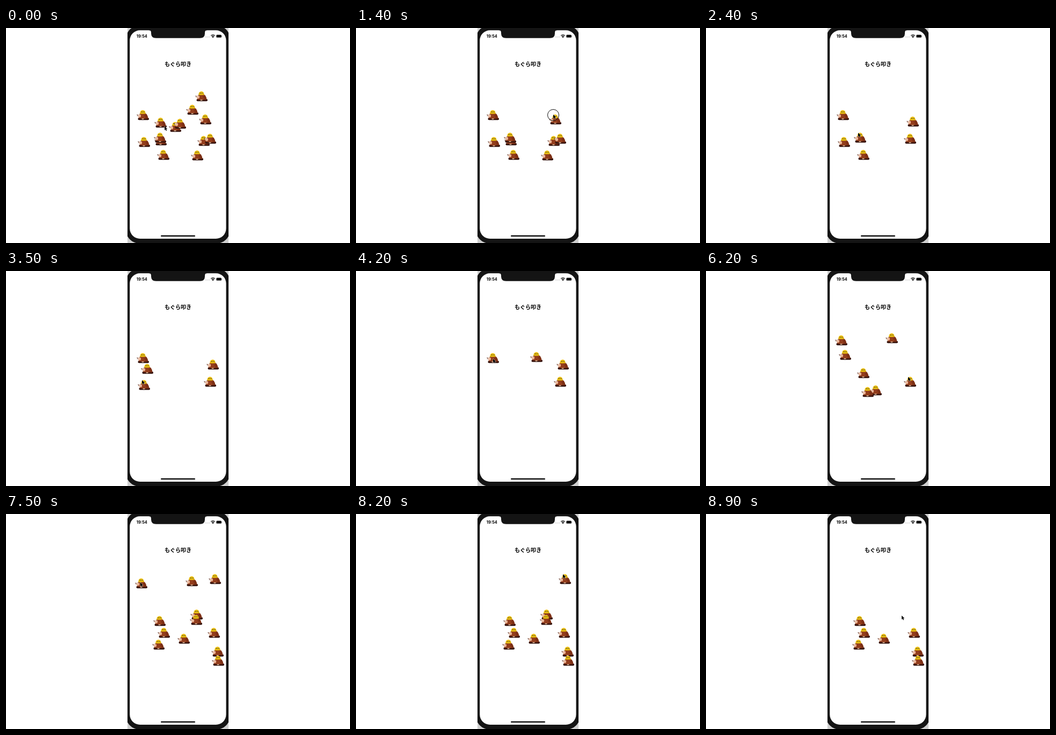
An HTML page for the animation above (9 s loop, 640 by 400 pixels).

```html
<!DOCTYPE html>
<html lang="ja">
<head>
<meta charset="utf-8">
<title>もぐら叩き</title>
<style>
  html, body { margin: 0; width: 100%; height: 100%; overflow: hidden; background: #fff; }
  svg { display: block; }
  .clock { font: 700 7.4px Inter, "Liberation Sans", sans-serif; }
  .title { font: 700 10px "Noto Sans CJK JP", "Noto Sans CJK", sans-serif; }
</style>
</head>
<body>
<svg width="640" height="400" viewBox="0 0 640 400">
  <defs>
    <clipPath id="shot"><rect x="226" width="188" height="400"/></clipPath>
    <g id="mole">
      <rect x="-8.5" y="5" width="20.5" height="4.3" rx="2.1" fill="#35130d"/>
      <path d="M-7 6C-7.5 2-6-2-2-4C3-5 7-3 8.6 0C9.8 2.4 10.4 4.5 10.2 6.3Q1 7.4-7 6Z" fill="#933d1c"/>
      <path d="M3 1Q6 3 5 6.3L10 6.2Q10 2 7-2.5Z" fill="#7d3016"/>
      <ellipse cx="-5.6" cy="1.6" rx="2.7" ry="3" fill="#e9b598"/>
      <ellipse cx="-8" cy=".2" rx="1.6" ry="1.4" fill="#f0d5c6"/>
      <path d="M-11-.6L-8.6-.2M-10.2 2L-8.2 1M-6-1.9L-4.4-1.2" stroke="#5c3a2e" stroke-width=".6"/>
      <circle cx="-9.2" cy="-.1" r=".7" fill="#5c2a22"/>
      <path d="M-1.8 6.4H2.8L2 8H-1Z" fill="#e9c7a5"/>
      <path d="M-4.8-2.8Q-4.9-8.7 .4-9.3Q5-9.2 5.8-3Q1-1.4-4.8-2.8Z" fill="#efc318"/>
      <path d="M-5-3Q.4-1.5 6-3.2" fill="none" stroke="#c99a0c" stroke-width=".9"/>
      <path d="M-2.4-5.7H-.6M.6-5.7H1.8M2.8-5.7H3.8" stroke="#4c4a14" stroke-width="1.6"/>
    </g>
  </defs>

  <g clip-path="url(#shot)">
    <rect x="226" width="188" height="400" fill="#cfcfcf"/>
    <rect x="223" y="-5" width="194" height="406" rx="26" fill="#141414"/>
    <rect x="230.3" y="4.2" width="179.2" height="387.8" rx="19" fill="#fff"/>
    <path d="M266 4V4.2Q270 4.2 270 8.5V10Q270 18.7 279 18.7H361Q370 18.7 370 10V8.5Q370 4.2 374 4.2V4Z" fill="#141414"/>
  </g>

  <text class="clock" x="242.8" y="17.9">19:54</text>
  <path d="M371.2 16.8H379" stroke="#b5b5b5" stroke-width="1.4" stroke-linecap="round" stroke-dasharray="0 2.4"/>
  <g fill="none" stroke="#000" stroke-width="1.2">
    <path d="M381.2 14.2Q385 11 388.8 14.2M382.7 15.9Q385 14 387.3 15.9"/>
    <circle cx="385" cy="17.2" r=".5"/>
  </g>
  <rect x="391.3" y="12.7" width="9.6" height="5" rx="1.5" stroke="#8c8c8c" stroke-width=".6"/>
  <rect x="401.5" y="14.2" width=".8" height="2" rx=".4" fill="#888"/>
  <text class="title" x="320" y="70.6" text-anchor="middle">もぐら叩き</text>
  <rect x="288" y="385.8" width="64" height="2.3" rx="1.15"/>

  <g id="field"></g>
  <circle id="tap" r="10.5" fill="none" stroke="#111"/>
  <path id="cursor" d="M0 0V7.2L1.7 5.7L2.9 8.4L4.2 7.8L3 5.2L5.2 5Z" stroke="#fff" stroke-width=".7" paint-order="stroke"/>
</svg>

<script>
const LOOP = 9000, STEP = 100;
const START = [295, 183], REST = [364, 189];
const $ = id => document.getElementById(id);
const show = (el, on) => el.setAttribute("visibility", on ? "visible" : "hidden");
const place = (el, x, y) => el.setAttribute("transform", `translate(${x} ${y})`);
const moles = [];

// Moles of a wave pop up and get hit at even intervals; later ones lie in front
function wave(born, bornGap, hit, hitGap, spots) {
  spots.split(" ").forEach((spot, i) => {
    const [x, y] = spot.split(",").map(Number);
    const el = document.createElementNS("http://www.w3.org/2000/svg", "use");
    el.setAttribute("href", "#mole");
    place(el, x, y);
    $("field").append(el);
    moles.push({ x, y, el, born: born + i * bornGap, hit: hit + i * hitGap });
  });
}

wave(0, 0, 100, 260, "287,176 314,184 323,178 346,152 363,127 370,170 367,210 355,237 287,209 286,204 292,236");
wave(0, 0, 3600, 1320, "256,212 254,162 379,206");
wave(3100, 0, 3860, 0, "262,182");
wave(5000, -1300, 5200, 350, "302,186 335,160 384,174");
wave(5400, 150, 6600, 250, "315,222 300,225 292,190 258,156");
wave(5500, 100, 7700, 260, "251,129 345,125");
wave(7000, 100, 8220, 240, "388,121 354,187 353,197");
wave(6700, 100, LOOP, LOOP, "285,199 293,221 283,243 330,232 386,221 393,256 394,273 ".trim());

// The pointer goes from hit to hit, aiming at the hat
const stops = [
  { t: 0, at: START },
  ...moles.filter(m => m.hit < LOOP)
    .sort((a, b) => a.hit - b.hit)
    .map(m => ({ t: m.hit, at: [m.x - 3, m.y - 9] })),
  { t: LOOP, at: REST }
];

// It arrives a little early and waits there
function pointerAt(t) {
  const i = stops.findIndex(s => s.t > t);
  const a = stops[i - 1], b = stops[i];
  const u = Math.min(1, (t - a.t) / (b.t - a.t) / 0.65);
  const k = u * u * (3 - 2 * u);
  return a.at.map((v, j) => v + (b.at[j] - v) * k);
}

function draw(t) {
  const [x, y] = pointerAt(t);
  for (const m of moles) show(m.el, t >= m.born && t < m.hit + STEP);
  place($("cursor"), x, y);
  place($("tap"), x, y + 1);
  show($("tap"), moles.some(m => t >= m.hit && t < m.hit + STEP));
}

const start = performance.now();
function tick(now) {
  const t = Math.max(0, now - start) % LOOP;
  draw(Math.floor(t / STEP) * STEP);
  requestAnimationFrame(tick);
}
draw(0);
requestAnimationFrame(tick);
</script>
</body>
</html>
```
